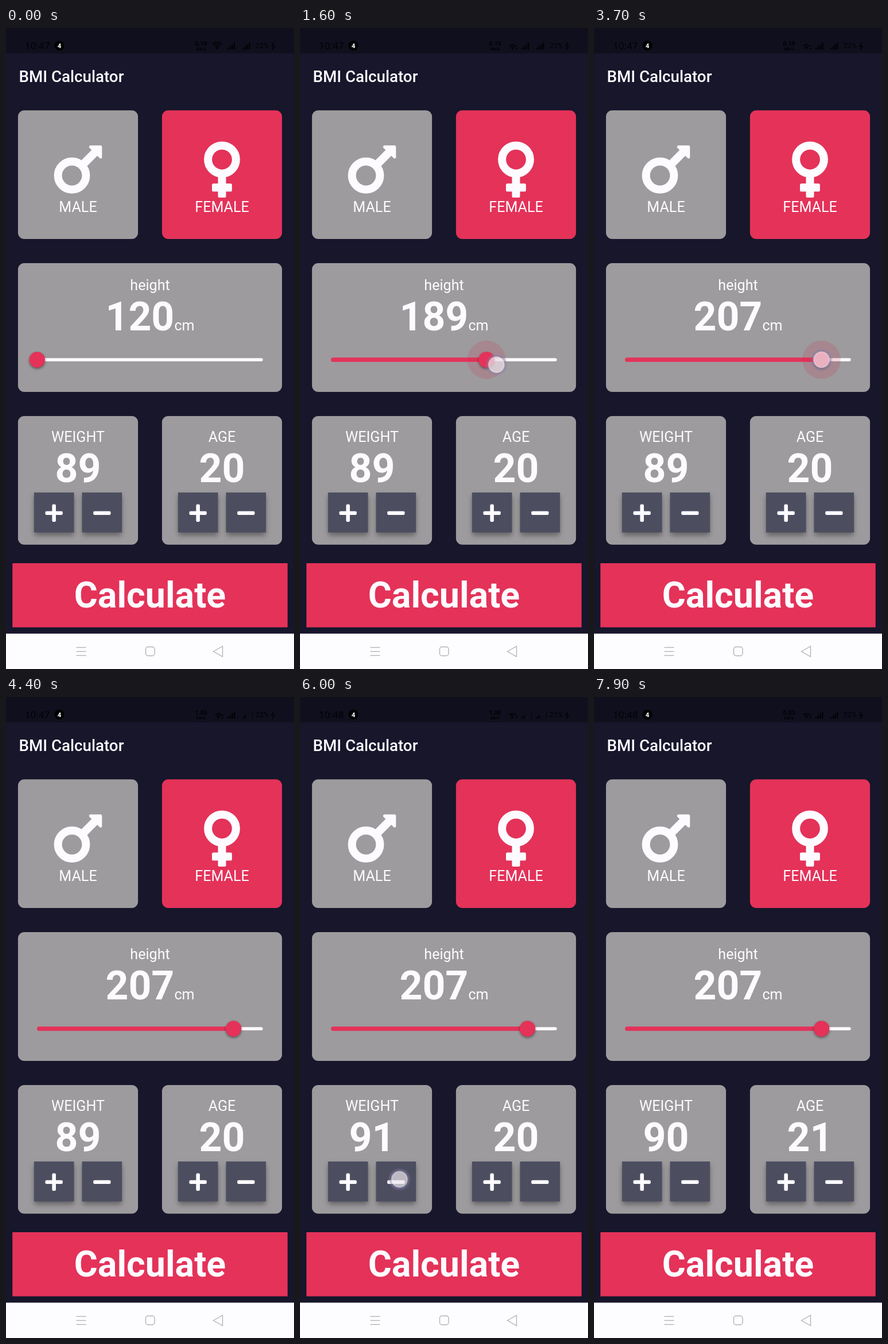
An HTML page with a canvas that plays this animation: 502x1115 px, repeating every 8 s.

```html
<!DOCTYPE html>
<html lang="en">
<head>
<meta charset="utf-8">
<title>BMI Calculator</title>
<style>
html, body { margin: 0; width: 100%; height: 100%; overflow: hidden; background: #17162b; }
canvas { display: block; width: 502px; height: 1115px; }
</style>
</head>
<body>
<canvas id="stage"></canvas>
<script>
const W = 502, H = 1115, LOOP = 8000, STEP = 100;
const PINK = '#e43259', GREY = '#9d9b9d', WHITE = '#fdfbff', DARK = '#4c4e60', INK = '#020207';
const LEFT = 20.9, RIGHT = 271.9, TRACK_Y = 577, BUTTON = 69.7, BUTTON_Y = 807.9;
const canvas = document.getElementById('stage');
const c = canvas.getContext('2d');
const dpr = window.devicePixelRatio || 1;
canvas.width = W * dpr;
canvas.height = H * dpr;

const ramp = (t, from, to) => Math.min(1, Math.max(0, (t - from) / (to - from)));

function ease(t, from, to) {
  const u = ramp(t, from, to);
  return u * u * (3 - 2 * u);
}

// The slider swings up, back down, then up to rest.
const heightAt = t =>
  120 + 76 * ease(t, 900, 1764) - 54 * ease(t, 1800, 2250) + 65 * ease(t, 2800, 3700);
const thumbX = t => 54.3 + (heightAt(t) - 120) * 3.934;

// Runs of quick taps on the plus and minus buttons.
const RUNS = [
  { card: LEFT, from: 4500, to: 5200, taps: 9 },
  { card: LEFT, from: 5300, to: 6100, taps: -8 },
  { card: RIGHT, from: 6200, to: 6800, taps: 6 },
  { card: RIGHT, from: 7100, to: 7600, taps: -5 }
];

const buttonX = (card, minus) => card + (minus ? 111.6 : 27.9);
const runAt = t => RUNS.find(r => t > r.from && t <= r.to);
const count = (card, start, t) => RUNS.filter(r => r.card === card)
  .reduce((sum, r) => sum + Math.round(r.taps * ramp(t, r.from, r.to)), start);

// The thumb trails the finger slightly while dragging.
function finger(t) {
  if (t >= 500 && t <= 4200) {
    const x = thumbX(t + 65);
    return [x, TRACK_Y + Math.abs(x - thumbX(t)) / 2];
  }
  const run = runAt(t);
  if (!run) return null;
  const minus = run.taps < 0;
  return [buttonX(run.card, minus) + BUTTON / 2 + (minus ? 6 : 0), minus ? 839 : 832];
}

function rect(x, y, w, h, color, r = 0) {
  c.fillStyle = color;
  c.beginPath();
  c.roundRect(x, y, w, h, r);
  c.fill();
}

function disc(x, y, r, color) {
  c.fillStyle = color;
  c.beginPath();
  c.arc(x, y, r, 0, 7);
  c.fill();
}

function line(points, color, width, closed) {
  c.strokeStyle = color;
  c.lineWidth = width;
  c.beginPath();
  points.forEach(([x, y]) => c.lineTo(x, y));
  if (closed) c.closePath();
  c.stroke();
}

function text(s, x, y, size, weight = 400, color = WHITE, align = 'center', family = 'Roboto') {
  c.font = `${weight} ${size}px "${family}", sans-serif`;
  c.textAlign = align;
  c.fillStyle = color;
  c.fillText(s, x, y);
}

function withShadow(color, blur, dy, draw) {
  c.save();
  c.shadowColor = color;
  c.shadowBlur = blur * dpr;
  c.shadowOffsetY = dy * dpr;
  draw();
  c.restore();
}

function ring(x, y) {
  c.strokeStyle = WHITE;
  c.lineWidth = 14;
  c.beginPath();
  c.arc(x, y, 24.4, 0, 7);
  c.stroke();
}

function maleIcon() {
  ring(115, 256.6);
  line([[134, 237.6], [157, 214.6]], WHITE, 14.2);
  c.fillStyle = WHITE;
  c.beginPath();
  c.moveTo(150, 204.3);
  c.arcTo(167.3, 204.3, 167.3, 228, 2.6);
  c.arcTo(167.3, 230.5, 143.5, 206.5, 2.4);
  c.arcTo(141.5, 204.3, 150, 204.3, 2.4);
  c.fill();
}

function femaleIcon() {
  ring(376.5, 228.8);
  rect(369.5, 257, 14, 38, WHITE, 2.6);
  rect(359, 270.6, 34.9, 14, WHITE, 2.6);
}

function bars(x, level) {
  for (let i = 0; i < level; i++) {
    const h = 3 + i * 3;
    rect(x + i * 3.7, 37.5 - h, 2.4, h, INK);
  }
  if (level < 4) rect(x + 17, 25, 1, 12.5, INK);
}

function wifi(full) {
  const x = full ? 368 : 370;
  c.strokeStyle = INK;
  c.lineWidth = 2;
  for (let r = 4; r <= (full ? 12 : 8); r += 4) {
    c.beginPath();
    c.arc(x, 37, r, -2.3, -0.84);
    c.stroke();
  }
  disc(x, 36, 1.6, INK);
  if (!full) {
    rect(376, 31, 3, 2, INK);
    rect(376, 35, 3, 2, INK);
  }
}

function statusBar(t) {
  rect(0, 0, W, 44, '#100f1d');
  text(t < 6000 ? '10:47' : '10:48', 33, 37, 17, 400, INK, 'left', 'Noto Sans');
  disc(93, 30.5, 8.6, '#000');
  text('4', 93, 34.8, 11.5, 700);
  text(t < 4000 ? '0.19' : t < 7900 ? '1.00' : '0.03', 340, 30.5, 10.5, 700, INK, 'center', 'Noto Sans');
  text('KB/S', 340, 38.5, 7.5, 700, INK, 'center', 'Noto Sans');
  wifi(t < 400);
  bars(386, t < 4700 || t >= 7500 ? 4 : 2);
  bars(412, t < 4100 || t >= 6200 ? 4 : 2);
  text('22%', 435, 35, 12.5, 400, INK, 'left');
  line([[467, 25], [463, 31.5], [468, 31.5], [464, 38]], INK, 1.6);
}

function navBar() {
  const grey = '#b4b3b7';
  rect(0, 1053.6, W, H - 1053.6, '#fdfcff');
  for (let y = 1077.5; y < 1092; y += 7) line([[122.5, y], [139.5, y]], grey, 1.4);
  c.beginPath();
  c.roundRect(243.5, 1076.5, 15.5, 15.5, 4);
  c.stroke();
  line([[361.5, 1084.5], [377.5, 1075.5], [377.5, 1093.5]], grey, 1.4, true);
}

const card = (x, y, w, color) => rect(x, y, w, 223.8, color, 11);

function button(x, minus, pressed) {
  const cx = x + BUTTON / 2, cy = BUTTON_Y + BUTTON / 2 + 1;
  withShadow('rgba(0,0,0,.38)', pressed ? 16 : 9, pressed ? 7 : 5,
    () => rect(x, BUTTON_Y, BUTTON, BUTTON, pressed ? '#757480' : DARK));
  rect(cx - 15.2, cy - 3.3, 30.4, 6.6, WHITE, 2.2);
  if (!minus) rect(cx - 3.3, cy - 15.2, 6.6, 30.4, WHITE, 2.2);
}

function counter(x, label, start, t) {
  const run = runAt(t);
  card(x, 674.9, 209.2, GREY);
  text(label, x + 104.6, 719.8, 25.1);
  text(count(x, start, t), x + 104.6, 790, 69.7, 700);
  for (const minus of [false, true]) {
    const held = run && run.card === x && run.taps < 0 === minus;
    button(buttonX(x, minus), minus, held && t / STEP % 2 === 1);
  }
}

function slider(t) {
  const x = thumbX(t);
  card(LEFT, 409.1, 460.2, GREY);
  text('height', 251, 455.6, 25.1);
  text(Math.round(heightAt(t)), 173.4, 525.7, 69.7, 700, WHITE, 'left');
  text('cm', 293.4, 525.7, 25.1, 400, WHITE, 'left');
  rect(x, TRACK_Y - 2.8, 447.7 - x, 5.6, WHITE, 2.8);
  if (x > 58) rect(54, TRACK_Y - 3.8, x - 54, 7.6, PINK, 3.8);
  const halo = 0.17 * ramp(t, 400, 600) * (1 - ramp(t, 4200, 4400));
  disc(x, TRACK_Y, 33.4, `rgba(205,40,75,${halo})`);
  withShadow('rgba(0,0,0,.45)', 4, 2, () => disc(x, TRACK_Y, 13.7, PINK));
}

function touch(x, y) {
  const g = c.createRadialGradient(x, y, 0, x, y, 20);
  const stop = (at, rgb, alpha) => g.addColorStop(at, `rgba(${rgb},${alpha})`);
  stop(0, '236,230,236', 0.7);
  stop(0.58, '236,230,236', 0.7);
  stop(0.66, '248,244,252', 0.75);
  stop(0.76, '132,126,165', 0.55);
  stop(1, '132,126,165', 0);
  disc(x, y, 20, g);
}

function draw(t) {
  c.setTransform(dpr, 0, 0, dpr, 0, 0);
  rect(0, 0, W, H, '#17162b');
  statusBar(t);
  text('BMI Calculator', 22.5, 94, 27.7, 500, WHITE, 'left');

  card(LEFT, 143.2, 209.2, GREY);
  maleIcon();
  text('MALE', 125.5, 320, 25.1);
  card(RIGHT, 143.2, 209.2, PINK);
  femaleIcon();
  text('FEMALE', 376.5, 320, 25.1);

  slider(t);
  counter(LEFT, 'WEIGHT', 89, t);
  counter(RIGHT, 'AGE', 20, t);

  rect(11.2, 931, 479.6, 111.5, PINK);
  text('Calculate', 251, 1008, 62.7, 700);
  navBar();
  const tip = finger(t);
  if (tip) touch(...tip);
}

function frame() {
  const t = performance.now() % LOOP;
  draw(Math.floor(t / STEP) * STEP);
  requestAnimationFrame(frame);
}
frame();
</script>
</body>
</html>
```
